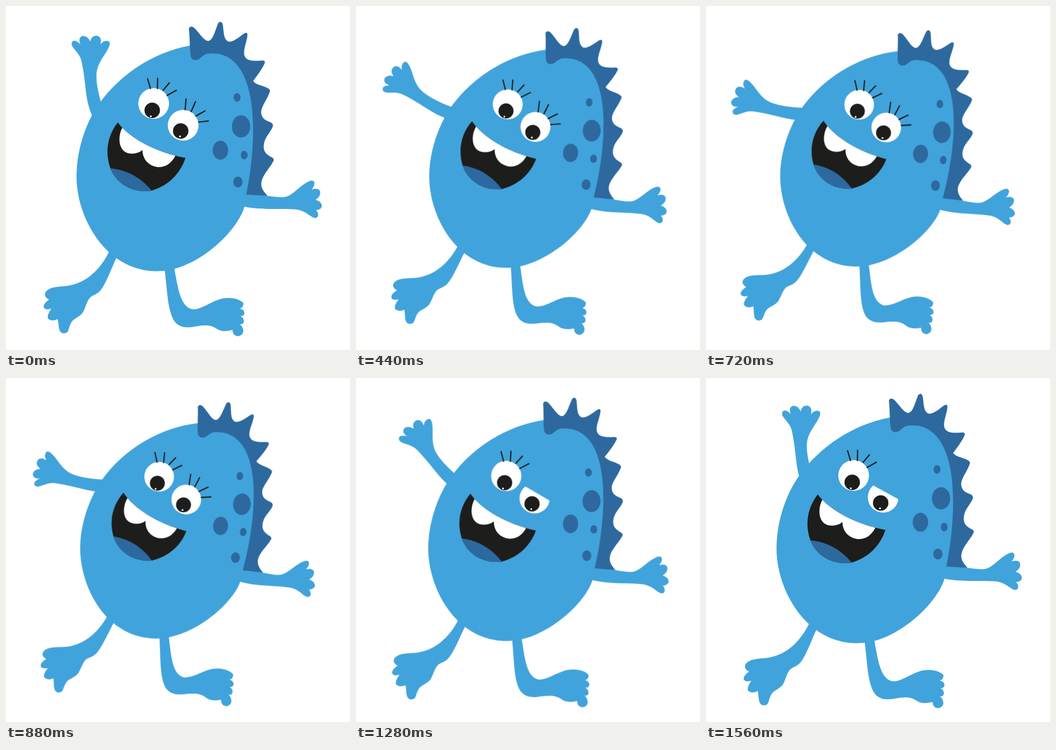
Write an HTML page without scripts that moves like this. It is 600 px wide and 600 px high and loops after 1600 ms.

```html
<!DOCTYPE html>
<html lang="en">
<head>
<meta charset="utf-8">
<title>Waving monster</title>
<style>
  html, body { margin: 0; width: 100%; height: 100%; overflow: hidden; background: #fff; }
  svg { display: block; width: 100%; height: 100%; }
  .skin { fill: #41a3db; }
  .dark { fill: #2d699e; }
  .ink { fill: #1d1d1b; }
  .white { fill: #fff; }
  .lashes { fill: none; stroke: #1d1d1b; stroke-width: 2.2; stroke-linecap: round; }

  .monster, .slide, .arm, .lid { animation: 1600ms linear infinite; }
  .monster { transform-origin: 300px 300px; animation-name: sway; }
  .slide { animation-name: slide; }
  .arm { transform-origin: 164.8px 189.9px; animation-name: wave; }
  .lid { animation-name: wink; animation-timing-function: step-end; }

  @keyframes sway {
    0%, 97.5%, 100% { transform: rotate(0deg) scale(1); }
    37.5%, 60% { transform: rotate(3.7deg) scale(.965); }
  }
  @keyframes wave {
    0%, 97.5%, 100% { transform: rotate(0deg); }
    37.5%, 60% { transform: rotate(-73.5deg); }
  }
  @keyframes slide {
    0%, 37.5% { transform: translate(0, 0); }
    97.5%, 100% { transform: translate(18px, -3.7px); }
  }
  @keyframes wink {
    0% { opacity: 0; }
    60%, 100% { opacity: 1; }
  }
</style>
</head>
<body>
<svg viewBox="0 0 600 600">
  <clipPath id="mouth">
    <path d="M195 203C214 230 262 256 313 265C303 295 281 314 254 322C222 327 193 311 182 283C172 255 177 226 195 203Z"/>
  </clipPath>

  <g class="monster">
    <!-- limbs and body -->
    <g class="skin">
      <g class="slide">
        <path class="arm" d="M168 175C160 150 157 130 158 118C160 98 172 88 179 73Q183 65 180 62Q172 58 165 67Q168 55 160 52Q150 50 147 62Q143 52 134 52Q125 55 130 67Q122 58 117 61Q112 65 117 72C123 80 130 86 132 97C137 120 138 140 141 160C143 172 146 182 150 191L158 205L178 195Z"/>
      </g>
      <path d="M410 325L455 331C485 335 489 335 502 325C512 317 520 309 530 305Q538 303 538 310Q537 316 533 320Q546 316 548 324Q549 332 540 338Q551 341 551 349Q550 355 541 356Q546 362 544 367Q541 372 534 368C526 363 520 357 508 355C480 352 450 357 416 350Z"/>
      <path d="M181 426C165 460 140 483 108 488C88 490 76 490 69 499Q65 507 75 512Q64 520 66 526Q69 531 79 528Q70 541 74 546Q81 551 90 546C92 552 91 560 94 567Q99 574 107 569C111 563 110 555 117 548C125 542 131 540 135 533C140 523 142 510 150 506C158 502 163 500 169 490C178 475 185 455 193 438Z"/>
      <path d="M276 455C281 490 281 522 290 543C298 562 315 562 330 559C347 556 357 556 366 562C374 568 383 568 395 565Q396 576 405 576Q414 574 414 566Q413 559 408 555Q415 556 415 549Q414 543 409 541Q416 541 416 535Q415 529 408 528Q415 525 414 518C405 508 385 508 374 511C355 517 340 530 325 529C303 524 300 490 293 455Z"/>
      <path d="M123 298C123 250 140 200 165 167C198 122 254 81 321 69C395 62 436 125 434 215C434 270 424 325 416 350C405 388 350 444 292 459C250 469 215 456 193 440C150 410 123 350 123 298Z"/>
    </g>

    <!-- crest and spots -->
    <g class="dark">
      <path d="M456 331C449 323 443 316 446 305C449 293 462 280 466 271Q469 267 464 264C452 258 448 252 450 240C452 228 461 221 465 211Q467 206 462 203C451 199 445 195 445 184C446 174 456 162 460 150Q462 146 456 143C446 138 437 138 431 131C436 124 447 110 451 100Q453 95 447 95C434 96 420 97 416 87C413 78 419 66 421 52Q422 44 415 48C407 54 393 66 386 61C379 56 380 44 378 32Q375 24 370 30C365 42 361 60 353 61C345 61 337 46 327 37Q320 34 319 40C321 55 320 80 323 90Q327 97 336 93C342 89 346 83 354 83C405 78 431 130 431 215C431 260 425 300 419 329Z"/>
      <ellipse cx="403" cy="159.5" rx="6" ry="7.5"/>
      <ellipse cx="410" cy="210" rx="16" ry="19.5"/>
      <ellipse cx="374" cy="251.5" rx="13.5" ry="16.5"/>
      <ellipse cx="415.5" cy="260" rx="6" ry="7.5"/>
      <ellipse cx="404.5" cy="307" rx="8" ry="9.5"/>
    </g>

    <!-- mouth -->
    <g clip-path="url(#mouth)">
      <path class="ink" d="M170 195H320V330H170Z"/>
      <path class="dark" d="M182 283C212 286 236 300 254 322V330H170V283Z"/>
      <path class="white" d="M203 212C196 225 195 245 207 254C215 260 231 258 238 251C238 268 250 280 266 281C280 281 289 273 295 262V250L203 200Z"/>
    </g>

    <!-- eyes -->
    <g class="white">
      <circle cx="257.5" cy="170" r="26.8"/>
      <circle cx="309" cy="208" r="26.8"/>
    </g>
    <g class="ink">
      <circle cx="255" cy="182" r="13.5"/>
      <circle cx="304.7" cy="218" r="13.5"/>
    </g>
    <g class="white">
      <circle cx="252.5" cy="192.3" r="1.6"/>
      <circle cx="303.5" cy="227.3" r="1.6"/>
    </g>
    <path class="lashes" d="M247 127L252 144M264.5 126L264 144M285 134L274 147M297 147L281 156M314 162L312.5 181M330.5 167L323 184M347 183L331 192M353 200.5L336 202.5"/>
    <path class="skin lid" d="M285 183.7L340 213.7L355 207V158H290Z"/>
  </g>
</svg>
</body>
</html>
```
